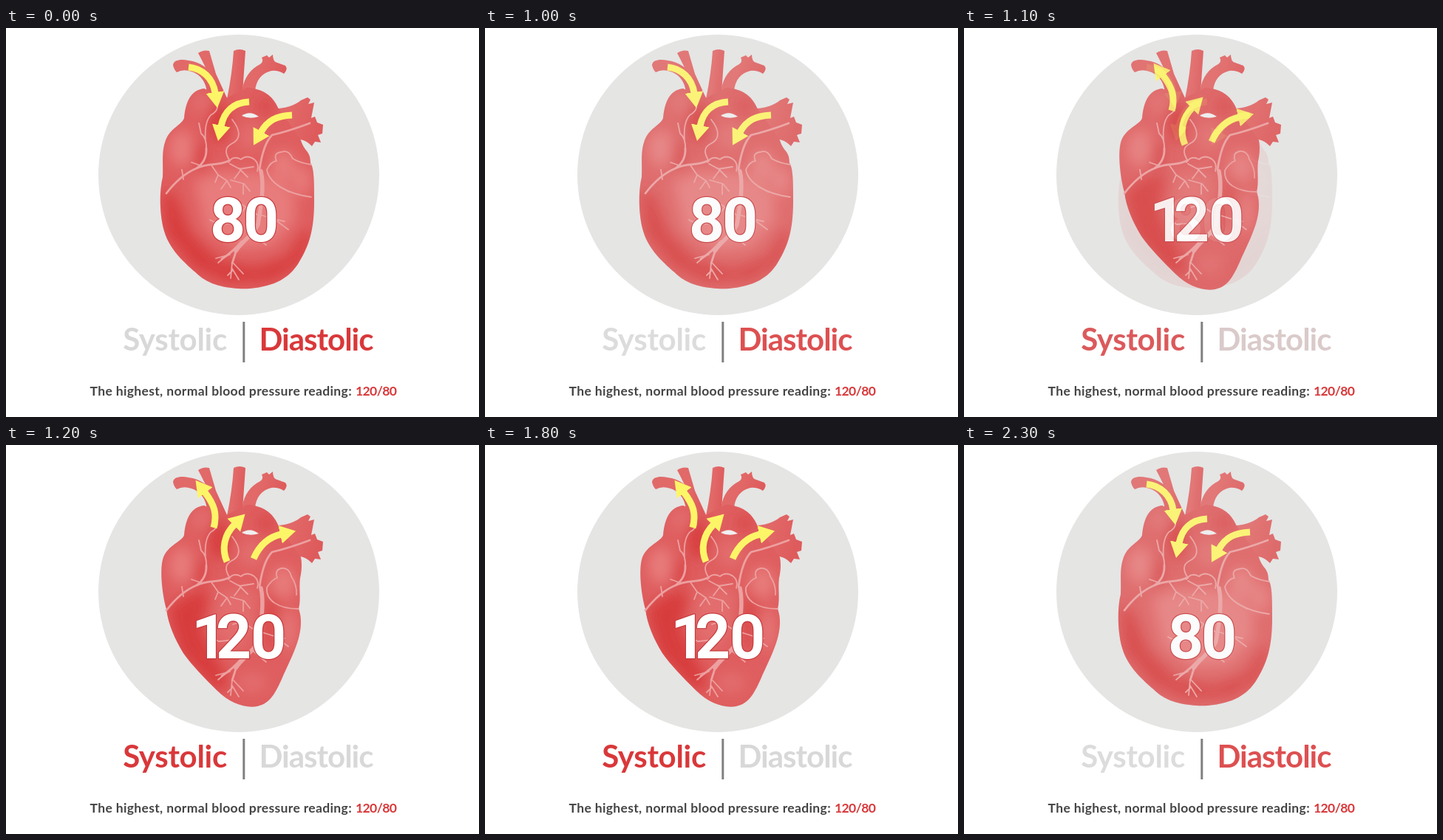
An HTML page for the animation above (2400 ms loop, 640x527 px).

```html
<!DOCTYPE html>
<html lang="en">
<head>
<meta charset="utf-8">
<title>Blood pressure</title>
<style>
  html, body { margin: 0; width: 100%; height: 100%; overflow: hidden; background: #fff; }
  svg { display: block; width: 100vw; height: 100vh; }

  .dia { animation: dia 2400ms step-end infinite; }
  .sys { animation: sys 2400ms step-end infinite; }
  @keyframes dia {
    0% { opacity: 1; }
    41.6667% { opacity: .88; }
    45.8333% { opacity: .1; }
    50% { opacity: 0; }
    91.6667% { opacity: .1; }
    95.8333% { opacity: .88; }
  }
  @keyframes sys {
    0% { opacity: 0; }
    45.8333% { opacity: .9; }
    50% { opacity: 1; }
    91.6667% { opacity: .9; }
    95.8333% { opacity: 0; }
  }

  text { font-family: Lato, sans-serif; font-weight: 700; }
  .label { font-size: 42px; letter-spacing: -1px; text-anchor: middle; }
  .first { letter-spacing: -.3px; }
  .note { font-size: 17.5px; letter-spacing: .35px; fill: #444; }
  .note.on { letter-spacing: -.6px; }
  .on, .note.on { fill: #d9383a; }
  .off { fill: #d8d8d8; }
  .value {
    font-family: Roboto, Arial, sans-serif; font-size: 84px;
    fill: #fff; stroke: #c73a3d; stroke-width: 2.4; stroke-linejoin: round; paint-order: stroke;
  }
  .arrow { fill: none; stroke: #fdf568; stroke-width: 9; marker-end: url(#head); }
  .vein { fill: none; stroke: #eda0a0; stroke-width: 1.8; stroke-linecap: round; stroke-linejoin: round; }
  .wide { stroke-width: 2.8; }
  .trunk { stroke-width: 5.5; }
  .body { fill: #df5e5f; }
  .dark { fill: #d63638; fill-opacity: .85; }
  .light { fill: #e87c7c; }
  .faint { fill-opacity: .5; }
  .soft { filter: url(#blur); }
</style>
</head>
<body>
<svg viewBox="0 0 640 527" preserveAspectRatio="none">
  <defs>
    <filter id="blur" x="-30%" y="-30%" width="160%" height="160%"><feGaussianBlur stdDeviation="9"/></filter>
    <marker id="head" markerUnits="userSpaceOnUse" markerWidth="22" markerHeight="26" viewBox="0 -13 22 26" refX="1" refY="0" orient="auto">
      <path d="M0-12.5 21.5 0 0 12.5Z" fill="#fdf568"/>
    </marker>
    <linearGradient id="tube" x1="0" x2="1" y1="0" y2=".25">
      <stop stop-color="#e06a69"/><stop offset=".45" stop-color="#e26968"/><stop offset="1" stop-color="#de5b5c"/>
    </linearGradient>

    <path id="diaBody" d="M268 82C250 84 243 100 241 122C238 131 222 136 216 152C210 168 213 182 212 202C207 222 208 255 214 275C222 304 249 324 262 336C280 351 308 354 330 353C364 350 384 338 396 318C410 295 417 274 417 235C417 215 417 196 414 187C410 182 414 177 408 168Q401 160 399 152L368 108C361 92 348 82 326 81L298 95Z"/>
    <path id="sysBody" d="M268 82C250 84 243 100 241 122C238 131 220 135 213 152C207 168 212 206 217 222C219 242 229 264 240 282C252 299 267 314 286 333C303 350 324 357 340 354C358 350 365 335 374 315C385 290 399 265 399 240Q399 230 396 222C400 208 395 190 399 175Q401 162 399 152L368 108C361 92 348 82 326 81L298 95Z"/>
    <clipPath id="diaClip"><use href="#diaBody"/></clipPath>
    <clipPath id="sysClip"><use href="#sysBody"/></clipPath>

    <g id="vessels" fill="url(#tube)">
      <path d="M226 50C227 43 237 42 247 44C263 46 275 55 281 66L297 94 272 94C273 74 263 63 251 59Q240 55 231 60Q227 56 226 50Z"/>
      <path d="M260 34Q267 29 275 31L284 62 300 97 283 91C279 70 269 51 260 34Z"/>
      <path d="M308 31Q316 27 324 31L320 88 299 96Q306 62 308 31Z"/>
      <path d="M319 86C322 66 332 55 344 49Q349 46 346 40L353 37 356 40 361 36Q361 46 367 47L378 51Q382 56 376 62Q368 57 359 58C346 61 338 71 337 86Z"/>
      <path d="M350 109C375 111 391 105 399 98L408 94 412 97 409 103 417 101 413 122 418 120 421 128 429 131 428 143 422 145 426 155 418 154 414 160Q406 152 398 151L350 160Z"/>
    </g>

    <g id="topShade">
      <ellipse class="light" cx="238" cy="163" rx="17" ry="24"/>
      <ellipse class="dark" cx="288" cy="128" rx="13" ry="28"/>
      <ellipse class="dark" cx="262" cy="172" rx="8" ry="20"/>
      <ellipse class="light faint" cx="264" cy="101" rx="14" ry="14"/>
      <ellipse class="dark faint" cx="352" cy="106" rx="12" ry="13"/>
      <ellipse class="light faint" cx="332" cy="147" rx="17" ry="18"/>
      <ellipse class="light" cx="375" cy="187" rx="17" ry="22"/>
    </g>

    <g id="veins" class="vein">
      <path class="wide" d="M217 224Q236 199 258 190C274 182 288 187 301 180M258 190Q272 180 271 163"/>
      <path d="M271 166Q272 149 264 143L261 129M270 153Q268 128 277 118 286 113 286 107M265 187 251 182M240 205 238 192"/>
      <path d="M306 124C318 139 318 151 305 157Q292 164 303 180"/>
      <path d="M301 182Q307 172 318 178 326 171 336 178 343 184 340 194M303 184 316 191 335 188M315 190 327 202M318 192 309 204"/>
      <path d="M278 186 287 199 283 209M287 199 299 207 304 216M299 207 291 218M304 206 322 211 330 221M321 211 321 225"/>
      <path class="wide" d="M343 192Q348 157 360 145 382 140 411 129"/>
      <path class="trunk" d="M345 194C350 216 344 247 341 266C336 279 320 288 311 302"/>
      <path class="wide" d="M319 289Q306 304 292 313M312 300 306 319"/>
      <path d="M303 307 284 312M293 313 287 318M306 318 304 339M306 326 315 341M308 319 321 333M306 329 300 335"/>
      <path d="M343 255 319 239 307 243M324 243 316 254M344 253 363 259 382 273M363 259 377 262M333 278 352 294M309 264 288 266 276 260"/>
    </g>
    <path id="gap" d="M319 119Q330 111 342 120Q330 124 319 119Z" fill="#efefef"/>
  </defs>

  <circle cx="315" cy="199" r="190" fill="#e5e5e4"/>
  <path d="M320.3 398h3v55h-3z" fill="#808080"/>
  <text class="note" x="468" y="498" text-anchor="end">The highest, normal blood pressure reading:</text>
  <text class="note on" x="473" y="498">120/80</text>

  <g class="sys">
    <use href="#vessels"/>
    <use href="#sysBody" class="body"/>
    <g clip-path="url(#sysClip)">
      <g class="soft">
        <path class="dark" d="M219 222 250 200 276 200 264 250 303 325 285 333 235 280Z"/>
        <path class="light faint" d="M291 195 339 194 336 250 311 283 280 250Z"/>
        <ellipse class="dark faint" cx="360" cy="236" rx="12" ry="42"/>
        <ellipse class="light" cx="382" cy="251" rx="9" ry="29"/>
        <ellipse class="light faint" cx="333" cy="322" rx="20" ry="13"/>
        <use href="#topShade"/>
      </g>
    </g>
    <use href="#veins"/>
    <path class="vein" d="M353 193C351 210 368 222 396 222M353 193Q360 182 367 180 363 169 373 167 383 166 386 178 394 190 393 203"/>
    <use href="#gap"/>
    <path class="arrow" d="M281 112C286 93 282 81 269 64"/>
    <path class="arrow" d="M299 158C291 140 296 121 309 108"/>
    <path class="arrow" d="M335 154C342 138 354 125 372 121"/>
    <text class="value" x="251 284 331" y="289">120</text>
    <text class="label first on" x="228.5" y="437">Systolic</text>
    <text class="label off" x="419.5" y="437">Diastolic</text>
  </g>

  <g class="dia">
    <use href="#vessels"/>
    <use href="#diaBody" class="body"/>
    <g clip-path="url(#diaClip)">
      <g class="soft">
        <path class="dark" d="M211 218 228 226 248 276 285 314 337 326 383 309 404 273 414 278 399 319 360 342 300 345 255 325 216 277Z"/>
        <path class="light" d="M254 207 288 195 342 194 389 219 392 261 359 296 313 300 270 273Z"/>
        <ellipse class="light" cx="401" cy="207" rx="12" ry="20"/>
        <use href="#topShade"/>
      </g>
    </g>
    <use href="#veins"/>
    <path class="vein" d="M353 192C356 211 382 225 413 229M353 192Q358 181 366 180 361 169 373 168 382 164 388 177 398 183 413 185M370 215 383 222"/>
    <use href="#gap"/>
    <path class="arrow" d="M247 53C266 55 280 68 283 88"/>
    <path class="arrow" d="M329 100C308 101 295 113 291 133"/>
    <path class="arrow" d="M387 118C366 119 354 125 345 141"/>
    <text class="value" x="276 321" y="289">80</text>
    <text class="label first off" x="228.5" y="437">Systolic</text>
    <text class="label on" x="419.5" y="437">Diastolic</text>
  </g>
</svg>
</body>
</html>
```
